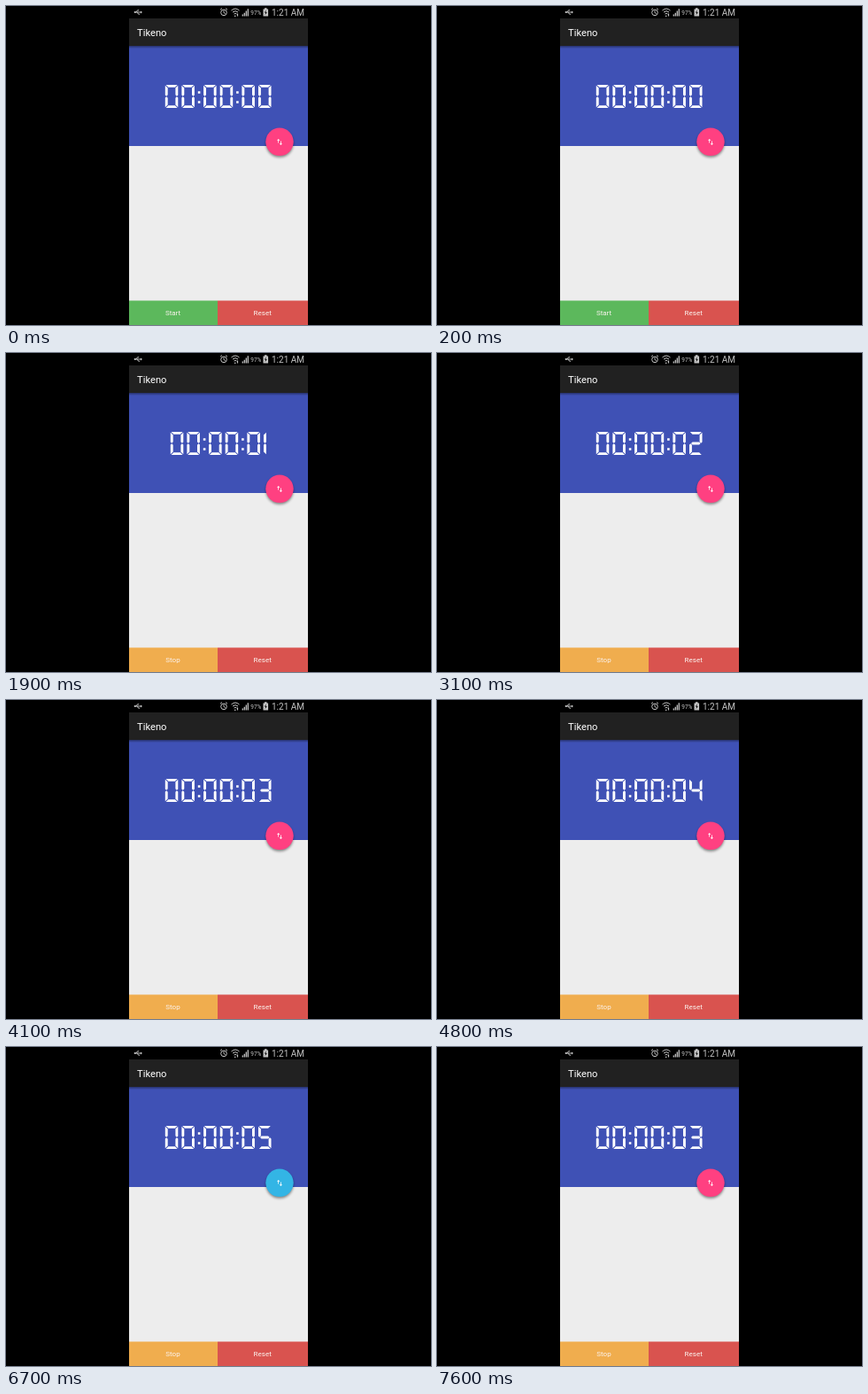
An HTML page for the animation above (8000 ms loop, 480 by 360 pixels).

```html
<!DOCTYPE html>
<html lang="en">
<head>
<meta charset="utf-8">
<title>Stopwatch</title>
<style>
html, body { margin: 0; width: 100%; height: 100%; overflow: hidden; background: #000; }
svg { display: block; width: 100vw; height: 100vh; }
text { font-family: Roboto, sans-serif; fill: #fff; }
.label { font-size: 8px; text-anchor: middle; fill: #fbf3ee; }
.status text { fill: #c4c4c4; }
.line { fill: none; stroke: #c4c4c4; }
</style>
</head>
<body>
<svg viewBox="0 0 480 360">
  <defs>
    <linearGradient id="shade" x2="0" y2="1">
      <stop stop-color="#000" stop-opacity=".4"/>
      <stop offset="1" stop-color="#000" stop-opacity="0"/>
    </linearGradient>
    <filter id="blur" x="-30%" y="-30%" width="160%" height="160%">
      <feGaussianBlur stdDeviation="1.5"/>
    </filter>
  </defs>
  <rect width="480" height="360"/>

  <g class="status">
    <path class="line" d="M145.5 7H152M147 7l1.5-2.2h1.7M148 7l1.6 2.2h1.5"/>
    <path d="M152 5.5L154 7l-2 1.5z" fill="#c4c4c4"/>
    <circle cx="145.7" cy="7" r="1.1" fill="#c4c4c4"/>
    <g class="line">
      <circle cx="246" cy="7.4" r="3.3"/>
      <path d="M246 5.3v2.3l1.6.9M242 4.3l2-1.8M250 4.3l-2-1.8"/>
      <path d="M254.5 5q4.5-4 9 0M256 7q3-2.6 6 0M257.5 9q1.5-1.2 3 0"/>
      <path d="M258 11.3h1.4M261.5 8.5v3" stroke-width="1.2"/>
      <path d="M267.3 11.5v-2M269.3 11.5V7.700M271.300 11.500V5.600M273.300 11.500V3.300" stroke-width="1.3"/>
    </g>
    <text x="276.300" y="10" font-size="6.500">97%</text>
    <path d="M290.500 3.500h1.500v-1.200h2.600v1.200h1.500v8h-5.600z" fill="#c4c4c4"/>
    <path d="M293.900 4.500l-2 3h1.300l-.6 2.800 2.200-3.400h-1.400z"/>
    <text x="300" y="10.700" font-size="10">1:21 AM</text>
  </g>

  <rect x="139" y="14" width="202" height="31" fill="#212121"/>
  <rect x="139" y="45" width="202" height="113" fill="#3f51b5"/>
  <rect x="139" y="45" width="202" height="3" fill="url(#shade)"/>
  <text x="148" y="34" font-size="11.200">Tikeno</text>
  <rect x="139" y="158" width="202" height="175" fill="#ededed"/>
  <path id="clock" fill="#fff"/>

  <circle cx="309" cy="155.300" r="15.500" opacity=".45" filter="url(#blur)"/>
  <circle id="fab" cx="309" cy="153.300" r="15.700"/>
  <path d="M307.700 150l-1.700 1.800h1.300v2.700h.8v-2.700h1.300zM310.400 157l1.700-1.800h-1.300v-2.700h-.8v2.700h-1.300z" fill="#fff"/>

  <rect id="toggle" x="139" y="332.500" width="100" height="27.500"/>
  <rect x="239" y="332.500" width="102" height="27.500" fill="#d9534f"/>
  <text id="action" class="label" x="188.500" y="349"></text>
  <text class="label" x="289.700" y="349">Reset</text>
</svg>
<script>
const LOOP = 8000;
const GREEN = '#5cb85c', PRESSED = '#47a04a', ORANGE = '#f0ad4e';
const PINK = '#ff4081', BLUE = '#33b5e5';

// [start in ms, seconds shown, button colour, round button colour]
const scenes = [
  [0, 0, GREEN, PINK],
  [1100, 0, PRESSED, PINK],
  [1900, 1, ORANGE, PINK],
  [2500, 2, ORANGE, PINK],
  [3500, 3, ORANGE, PINK],
  [4500, 4, ORANGE, PINK],
  [5500, 5, ORANGE, PINK],
  [6500, 5, ORANGE, BLUE],
  [7100, 4, ORANGE, PINK],
  [7500, 3, ORANGE, PINK]
];

const segments = {
  a: 'M.8 0h13l-2.700 2.800h-7.600z',
  b: 'm14.500 .8v10.700l-1.400 1.300l-1.500-1.500v-7.700z',
  c: 'm14.500 25.200v-10.700l-1.400-1.300l-1.500 1.500v7.700z',
  d: 'm.8 26h13l-2.700-2.800h-7.600z',
  e: 'm0 25.200v-10.700l1.400-1.300l1.500 1.500v7.700z',
  f: 'm0 .8v10.700l1.400 1.300l1.500-1.500v-7.700z',
  g: 'm2 13l1.500-1.400h7.600l1.500 1.400l-1.500 1.400h-7.600z'
};
const digits = ['abcdef', 'bc', 'abged', 'abgcd', 'fgbc', 'afgcd'];
const colon = 'm0 7.200h2.600v2.600h-2.600zm0 11h2.600v2.600h-2.600z';

const byId = id => document.getElementById(id);
const at = (x, y, shape) => `M${x} ${y}${shape.replace(/^M/i, 'm')}`;
const digit = (n, x) => [...digits[n]].map(s => at(x, 89, segments[s])).join('');

function clockPath(seconds) {
  // A narrow 1 recentres the whole line.
  const narrow = seconds === 1;
  const left = narrow ? 185.800 : 179.800;
  const zeros = [0, 18.600, 43.300, 61.900, 86.600].map(x => digit(0, left + x));
  const colons = [37, 80.300].map(x => at(left + x, 89, colon));
  const last = digit(seconds, left + 105.200 - (narrow ? 11.600 : 0));
  return zeros.join('') + colons.join('') + last;
}

// Move from the glyph corner to each segment's own first point.
for (const s in segments) {
  segments[s] = segments[s].replace(/^M/, 'm');
}

let shown;
function draw(now) {
  const t = now % LOOP;
  const scene = scenes.findLast(s => s[0] <= t);
  if (scene !== shown) {
    shown = scene;
    const [, seconds, button, round] = scene;
    byId('clock').setAttribute('d', clockPath(seconds));
    byId('toggle').setAttribute('fill', button);
    byId('fab').setAttribute('fill', round);
    byId('action').textContent = button === ORANGE ? 'Stop' : 'Start';
  }
}

const start = performance.now();
function tick() {
  draw(performance.now() - start);
  requestAnimationFrame(tick);
}
tick();
</script>
</body>
</html>
```
